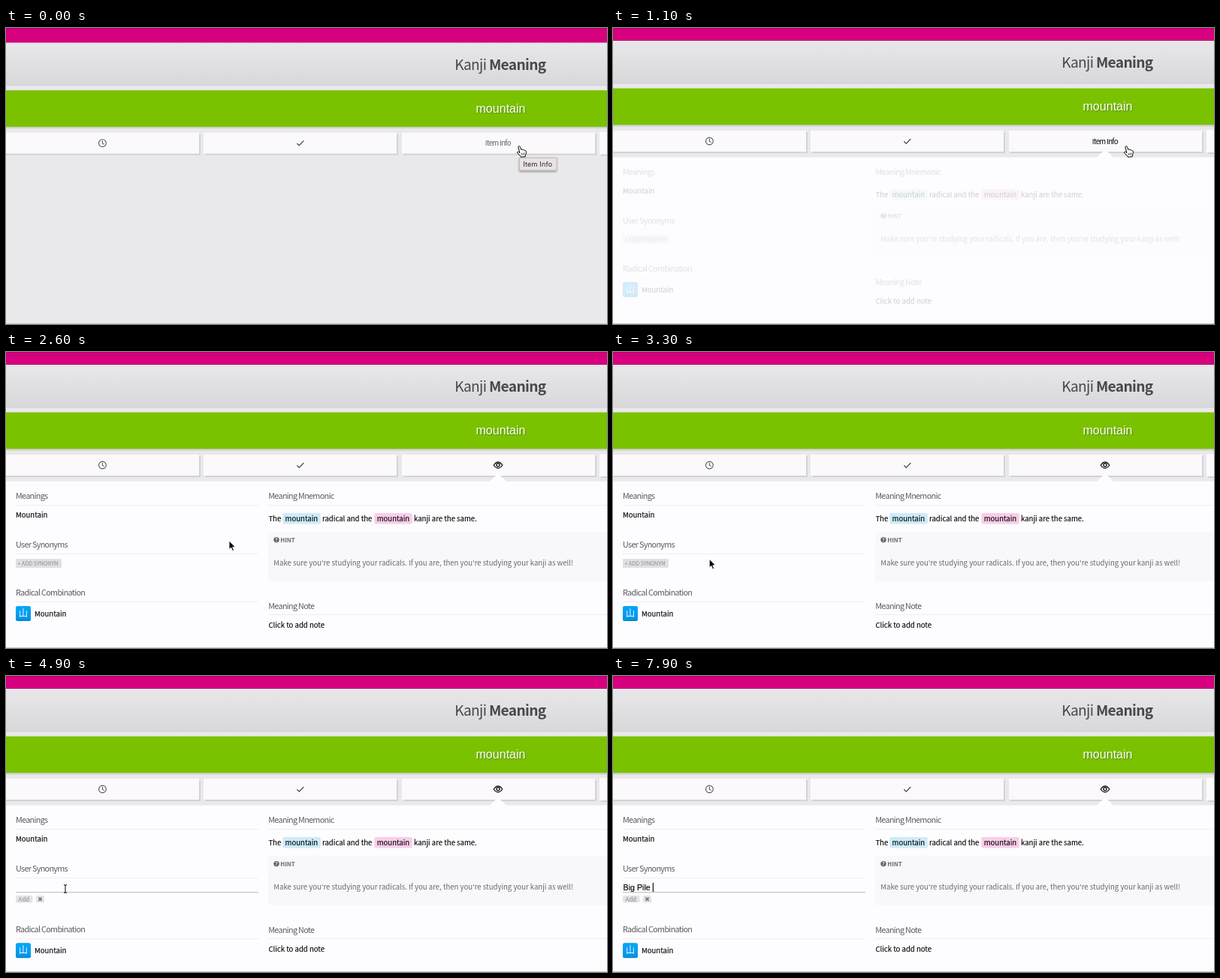
An HTML page for the animation above (8 s loop, 800x395 px).

```html
<!DOCTYPE html>
<html lang="en">
<head>
<meta charset="utf-8">
<title>Adding a synonym</title>
<style>
html, body { margin: 0; width: 100%; height: 100%; overflow: hidden; background: #e9e8ea; }
svg { display: block; width: 800px; height: 395px; }
text { font: 9.57px "Noto Sans CJK JP", "Noto Sans CJK", "Noto Sans", sans-serif; white-space: pre; }
.body { fill: #000; stroke: #000; stroke-width: .12px; }
.head { font-size: 10.77px; letter-spacing: -.67px; fill: #5c5c5e; }
.title { font-size: 19.15px; letter-spacing: -.67px; fill: #48484a; }
.title tspan, .small { font-weight: bold; }
.tab { letter-spacing: -.67px; }
.small { font-size: 7.9px; fill: #6a6a6c; }
.arial { font-family: "Liberation Sans", Arial, sans-serif; }
.answer { font-size: 16.06px; fill: #fff; text-anchor: middle; text-shadow: 1px 1px 1px rgba(0,0,0,.3); }
.tip { font: 9px Inter, sans-serif; letter-spacing: .2px; fill: #2a2527; }
.rule { stroke: #eeedef; }
.icon { fill: none; stroke: #58585a; stroke-width: 1.1; }
</style>
</head>
<body>
<svg viewBox="0 0 800 395">
  <defs>
    <linearGradient id="bar" x2="0" y2="1">
      <stop stop-color="#e8e7e9"/><stop offset="1" stop-color="#d8d7d9"/>
    </linearGradient>
    <linearGradient id="blue" x2="0" y2="1">
      <stop stop-color="#00a8fa"/><stop offset="1" stop-color="#0093e8"/>
    </linearGradient>
    <filter id="blur"><feGaussianBlur stdDeviation="1.6"/></filter>
  </defs>
  <rect width="800" height="395" fill="#e9e8ea"/>

  <g id="page">
    <rect y="-4" width="800" height="21" fill="#d7007f"/>
    <rect y="16" width="800" height="1" fill="#b9006d"/>
    <rect y="17" width="800" height="57" fill="url(#bar)"/>
    <rect y="73.5" width="800" height="1" fill="#d2d1d3"/>
    <text class="title" x="597.3" y="53">Kanji <tspan>Meaning</tspan></text>
    <rect y="129" width="800" height="2.5" fill="#d2d1d4"/>
    <rect y="80.5" width="800" height="48.8" fill="#7ac200"/>
    <text class="answer arial" x="658.5" y="110.3">mountain</text>
    <g id="tabs"></g>
    <g class="icon">
      <circle cx="128.4" cy="151" r="4.9"/>
      <path d="M128.4 147.8V151.3L130.6 152.6"/>
      <path d="M387.3 151.3L390.2 154.2L396.3 147.9" stroke-width="1.4"/>
    </g>
    <text class="tab" id="label" x="637.8" y="154.8">Item Info</text>
    <g id="eye" fill="none" stroke="#000" stroke-width="1.2">
      <path d="M649.2 151Q655 142.8 660.8 151Q655 159.2 649.2 151Z"/>
      <circle cx="655" cy="150.8" r="2.1"/>
    </g>
  </g>
  <rect width="800" height="1" fill="#b4006a"/>

  <g id="panel">
    <path d="M0 172.5H644L655 162L666 172.5H800V395H0Z" fill="#fdfcfe"/>
    <g id="info">
      <path class="rule" d="M13 204.5H336M13 269.5H336M349 204.5H800M349 350.5H800"/>
      <text class="head" x="13" y="196">Meanings</text>
      <text class="body" x="13" y="221">Mountain</text>
      <text class="head" x="13" y="261">User Synonyms</text>

      <g id="add">
        <rect id="addBox" x="13" y="276" width="61" height="12" rx="1.5"/>
        <text id="addText" x="15.6" y="284.8" style="font-size:7.1px">+ ADD SYNONYM</text>
      </g>
      <g id="form">
        <text class="body arial" id="typed" x="13.5" y="286" style="font-size:10.7px"></text>
        <rect id="caret" y="276" width="1.1" height="12"/>
        <path d="M13 288.7H336" stroke="#b9b8ba"/>
        <rect x="13" y="293" width="22.5" height="9.5" rx="1.5" fill="#e4e3e5"/>
        <text class="small" x="16.6" y="300.6" style="fill:#8b8a8c;font-weight:400">Add</text>
        <rect x="40" y="293" width="11" height="9.5" rx="1.5" fill="#e4e3e5"/>
        <path d="M43.4 295.6L47.6 299.8M47.6 295.6L43.4 299.8" stroke="#777" stroke-width="1.7"/>
      </g>

      <g id="radical">
        <path class="rule" d="M13 333.5H336"/>
        <text class="head" x="13" y="325">Radical Combination</text>
        <rect x="13" y="339.3" width="20" height="19.7" rx="2.5" fill="#007fca"/>
        <rect x="13" y="339.3" width="20" height="18.5" rx="2.5" fill="url(#blue)"/>
        <text x="23" y="353" text-anchor="middle" fill="#fff" style="font-size:12px">山</text>
        <text class="body" x="38" y="352.6">Mountain</text>
      </g>

      <text class="head" x="349.3" y="196">Meaning Mnemonic</text>
      <rect x="368.3" y="215" width="50.5" height="14.5" rx="2.5" fill="#cdebf9"/>
      <rect x="490.3" y="215" width="50.5" height="14.5" rx="2.5" fill="#f9cdea"/>
      <g class="body">
        <text x="349.4" y="225.7">The</text>
        <text x="371.6" y="225.7">mountain</text>
        <text x="421" y="225.7">radical and the</text>
        <text x="493.7" y="225.7">mountain</text>
        <text x="543" y="225.7">kanji are the same.</text>
      </g>
      <rect x="349" y="240" width="451" height="66" fill="#f8f7f9"/>
      <circle cx="360" cy="250.6" r="3.7" fill="#646366"/>
      <text x="360" y="253.2" text-anchor="middle" fill="#fff" style="font-size:6.4px;font-weight:bold">?</text>
      <text class="small" x="365.2" y="253.7">HINT</text>
      <text x="356.3" y="285.3" fill="#69686b">Make sure you're studying your radicals. If you are, then you're studying your kanji as well!</text>
      <text class="head" x="349.3" y="343">Meaning Note</text>
      <text class="body" x="349.4" y="367.6">Click to add note</text>
    </g>
  </g>
  <rect y="394" width="800" height="1" fill="#cbcacc"/>

  <g id="tip">
    <rect x="683" y="174" width="50" height="18" rx="1" fill="#000" opacity=".35" filter="url(#blur)"/>
    <rect x="683.5" y="173.5" width="49.5" height="16.5" fill="#e9e3e5" stroke="#c6bcbe"/>
    <text class="tip" x="688.3" y="184.9">Item Info</text>
  </g>

  <g id="cursor">
    <g id="hand" stroke="#000" stroke-width="1" stroke-linejoin="round">
      <path fill="#fff" d="M-1.2 1.1C-.7 -.2 1 -.2 1.5 1.1L2.8 4.9C3.6 4.1 4.9 4.3 5.1 5.4C6 4.7 7.2 5.1 7.4 6.2C8.4 5.7 9.3 6.3 9.4 7.4C9.7 9.3 9.2 11 8.4 12.3L8.2 14.2L2.4 14.7L1.8 13.2L-2.2 9.6C-3.2 8.3 -1.9 7.1 -.7 8L.9 9.1Z"/>
      <path d="M3.2 9.4L3.6 12.2M5.2 9.2L5.5 12M7.1 9L7.3 11.8" stroke-width=".7"/>
    </g>
    <path id="arrow" d="M0 0V11.4L2.6 9L4.5 13.4L6.4 12.6L4.6 8.3H8.2Z" stroke="#fff" stroke-width=".9"/>
    <path id="beam" d="M-2 -5Q0 -5 0 -3.5Q0 -5 2 -5M0 -3.5V4.5M-2 6Q0 6 0 4.5Q0 6 2 6" fill="none" stroke="#000"/>
  </g>
</svg>
<script>
const $ = id => document.getElementById(id);
const show = (id, on) => $(id).style.display = on ? '' : 'none';
const clamp = v => Math.max(0, Math.min(1, v));
const ease = v => (v = clamp(v)) * v * (3 - 2 * v);

const tabs = [[-6, 137, 28], [263, 137, 28], [527, 137, 28], [790, 136, 30]];
$('tabs').innerHTML = tabs.map(([x, y, h], i) => {
  const w = i ? 257 : 263;
  return `<rect x="${x + 2}" y="${y + 2}" width="${w}" height="${h}" fill="#d3d2d4"/>
    <rect x="${x}" y="${y}" width="${w}" height="${h}" fill="#fbf9fc"/>`;
}).join('');

const phrase = 'Big Pile ';
const keyTimes = [5300, 5600, 5800, 6100, 6900, 7100, 7300, 7500, 7800];

// Cursor stops: start time, arrival time, x, y
const moves = [[2050, 2600, 297, 252], [2850, 3500, 79, 283.5]];

function cursorAt(t) {
  let x = 683, y = 157.5;
  for (const [from, to, nx, ny] of moves) {
    const k = ease((t - from) / (to - from));
    x += (nx - x) * k;
    y += (ny - y) * k;
  }
  return [x, y];
}

function draw(t) {
  const open = t >= 1100, editing = t >= 4200;
  const [x, y] = cursorAt(t);
  const onTab = x > 527 && y < 166;
  const onAdd = !editing && x < 82 && y > 275;

  $('page').setAttribute('transform', `translate(0 ${open ? 0 : 2.6})`);
  $('label').style.fill = open ? '#000' : '#626164';
  show('label', onTab);
  show('eye', !onTab);
  show('panel', open);
  $('info').style.opacity = clamp((t - 1050) / 300);
  $('tip').style.opacity = clamp((900 - t) / 300);

  $('addBox').style.fill = onAdd ? '#aeadaf' : '#e0dfe1';
  $('addText').style.fill = onAdd ? '#f0eff1' : '#8c8b8d';
  show('add', !editing);
  show('form', editing);
  $('radical').setAttribute('transform', `translate(0 ${editing ? 17.3 : 0})`);

  const count = keyTimes.filter(k => k <= t).length;
  const lastKey = count ? keyTimes[count - 1] : 4200;
  $('typed').textContent = phrase.slice(0, count);
  $('caret').setAttribute('x', 13.6 + (count ? $('typed').getComputedTextLength() : 0));
  show('caret', (t - lastKey) % 1000 < 500);

  $('cursor').setAttribute('transform', `translate(${x} ${y})`);
  show('cursor', !count);
  show('hand', onTab || onAdd);
  show('beam', editing);
  show('arrow', !onTab && !onAdd && !editing);
}

const start = performance.now();
function tick() {
  const t = (performance.now() - start) % 8000;
  draw(Math.floor(t / 100) * 100);
  requestAnimationFrame(tick);
}
tick();
</script>
</body>
</html>
```
